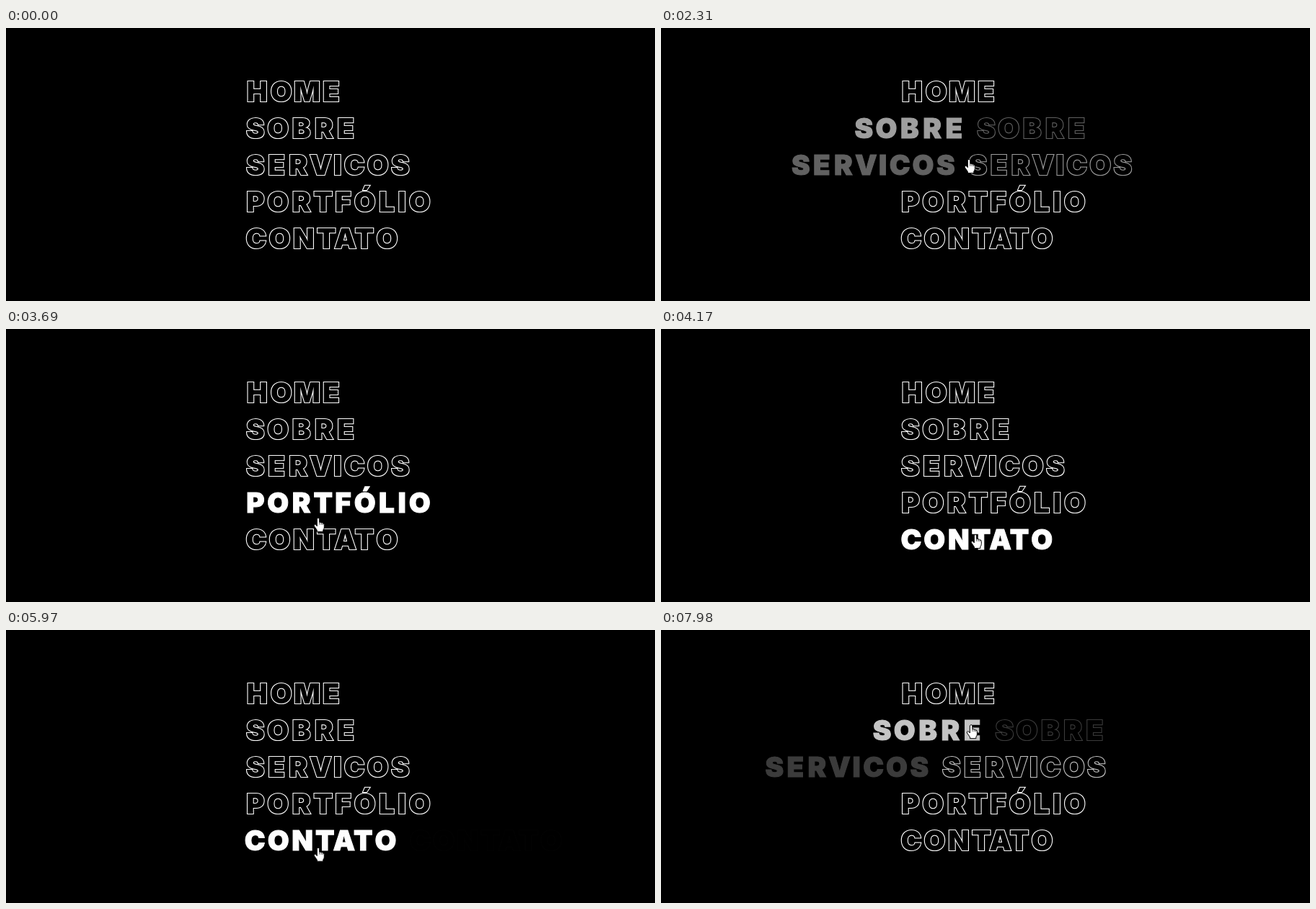
An HTML page that plays this animation: 900x379 px, repeating every 8000 ms.

```html
<!DOCTYPE html>
<html lang="pt">
<head>
<meta charset="utf-8">
<title>Menu</title>
<style>
  html, body { margin: 0; width: 100%; height: 100%; overflow: hidden; background: #000; }
  svg { display: block; width: 100vw; height: 100vh; }
  text {
    font: 900 38.6px Inter, "Liberation Sans", sans-serif;
    text-anchor: middle;
    fill: #fff;
    stroke: #fff;
  }
  .solid { stroke-width: 1; }
  /* The black fill covers the inner half of the stroke. */
  .outline { fill: #000; stroke-width: 2.2; paint-order: stroke; }
</style>
</head>
<body>
<svg viewBox="0 0 900 379">
  <g id="menu"></g>
  <g id="hand">
    <path d="M-1.7 1.4Q0-1 1.7 1.4V6.3Q3.2 5.4 4.1 6.9Q5.6 6.2 6.3 7.7Q8.2 7.3 8.3 9.4V13.2Q8.3 15.4 6.8 17V19.3H-1.6V17.4L-5.6 11.6Q-6.3 9.7-4.7 9.3Q-3.3 9.2-1.7 11.6Z"
          fill="#fff" stroke="#000"/>
    <path d="M1.7 6.3V9.6M4.1 6.9V9.8M6.3 7.7V10" fill="none" stroke="#000" stroke-width=".7"/>
  </g>
</svg>
<script>
const LOOP = 8000, FADE = 400;
const LEFT = 331.4, TOP = 62.5, PITCH = 51, BASELINE = 39.5, GAP = 15.6;
const UNIT = 40.2 / 18;
const LABELS = ['HOME', 'SOBRE', 'SERVICOS', 'PORTFÓLIO', 'CONTATO'];

// Key points of the pointer: time, x, y
const PATH = [
  [390, 430, -8], [800, 429, 62], [2216, 427, 164.5], [2310, 427, 182],
  [3690, 433, 262], [4170, 436, 285], [4800, 436, 370], [5250, 436, 370],
  [5620, 435, 317], [5970, 433, 302], [6900, 437, 236], [7792, 431, 164.5], [8000, 430, 128]
];

const menu = document.getElementById('menu');
const hand = document.getElementById('hand');

// Letter cells grow by one unit per group; I is narrow.
const GROUPS = ['FL', 'EPST', 'ABCRV', 'HNOÓ', '', 'M'];
const cell = ch => UNIT * (ch === 'I' ? 7 : 12 + GROUPS.findIndex(g => g.includes(ch)));
const kern = pair => /TA|AT/.test(pair) ? -1.65 * UNIT : 0;

function pointer(t) {
  const i = Math.max(1, PATH.findIndex(point => point[0] >= t));
  const [t0, x0, y0] = PATH[i - 1], [t1, x1, y1] = PATH[i];
  const k = (t - t0) / (t1 - t0);
  return [x0 + (x1 - x0) * k, y0 + (y1 - y0) * k];
}

// cubic-bezier(.25, .1, .25, 1)
function ease(x) {
  if (x <= 0) return 0;
  if (x >= 1) return 1;
  const curve = (a, b, s) => 3 * a * s * (1 - s) ** 2 + 3 * b * s * s * (1 - s) + s ** 3;
  let lo = 0, hi = 1;
  for (let i = 0; i < 24; i++) {
    const mid = (lo + hi) / 2;
    if (curve(.25, .25, mid) < x) lo = mid; else hi = mid;
  }
  return curve(.1, 1, lo);
}

function addText(label, xs, y, cls) {
  const el = document.createElementNS('http://www.w3.org/2000/svg', 'text');
  el.setAttribute('x', xs.join(' '));
  el.setAttribute('y', y);
  el.setAttribute('class', cls);
  el.textContent = label;
  return menu.appendChild(el);
}

const rows = LABELS.map((label, i) => {
  let pen = 0;
  const xs = [...label].map((ch, k) => {
    pen += kern(label.slice(Math.max(0, k - 1), k + 1));
    const mid = LEFT + pen + cell(ch) / 2;
    pen += cell(ch);
    return mid.toFixed(2);
  });
  const y = TOP + BASELINE + i * PITCH;
  return {
    turns: [],
    travel: pen + GAP,
    outline: addText(label, xs, y, 'outline'),
    solid: addText(label, xs, y, 'solid')
  };
});

// Follow the pointer once to note when it enters (+1) and leaves (-1) each row.
let over;
for (let t = PATH[0][0]; t < LOOP; t += 2) {
  const row = rows[Math.floor((pointer(t)[1] - TOP) / PITCH)];
  if (row === over) continue;
  if (over) over.turns.push([t, -1]);
  if (row) row.turns.push([t, 1]);
  over = row;
}

function place(el, dx, opacity) {
  el.setAttribute('transform', `translate(${dx.toFixed(2)} 0)`);
  el.setAttribute('opacity', opacity.toFixed(4));
}

function draw(t) {
  for (const { turns, travel, outline, solid } of rows) {
    const p = turns.reduce((sum, [at, sign]) => sum + sign * ease((t - at) / FADE), 0);
    place(solid, (p - 1) * travel, p);
    place(outline, p * travel, 1 - p);
  }
  const [x, y] = pointer(t);
  hand.setAttribute('visibility', t < PATH[0][0] ? 'hidden' : 'visible');
  hand.setAttribute('transform', `translate(${x.toFixed(2)} ${y.toFixed(2)})`);
}

const start = performance.now();
function tick() {
  draw((performance.now() - start) % LOOP);
  requestAnimationFrame(tick);
}
tick();
</script>
</body>
</html>
```
